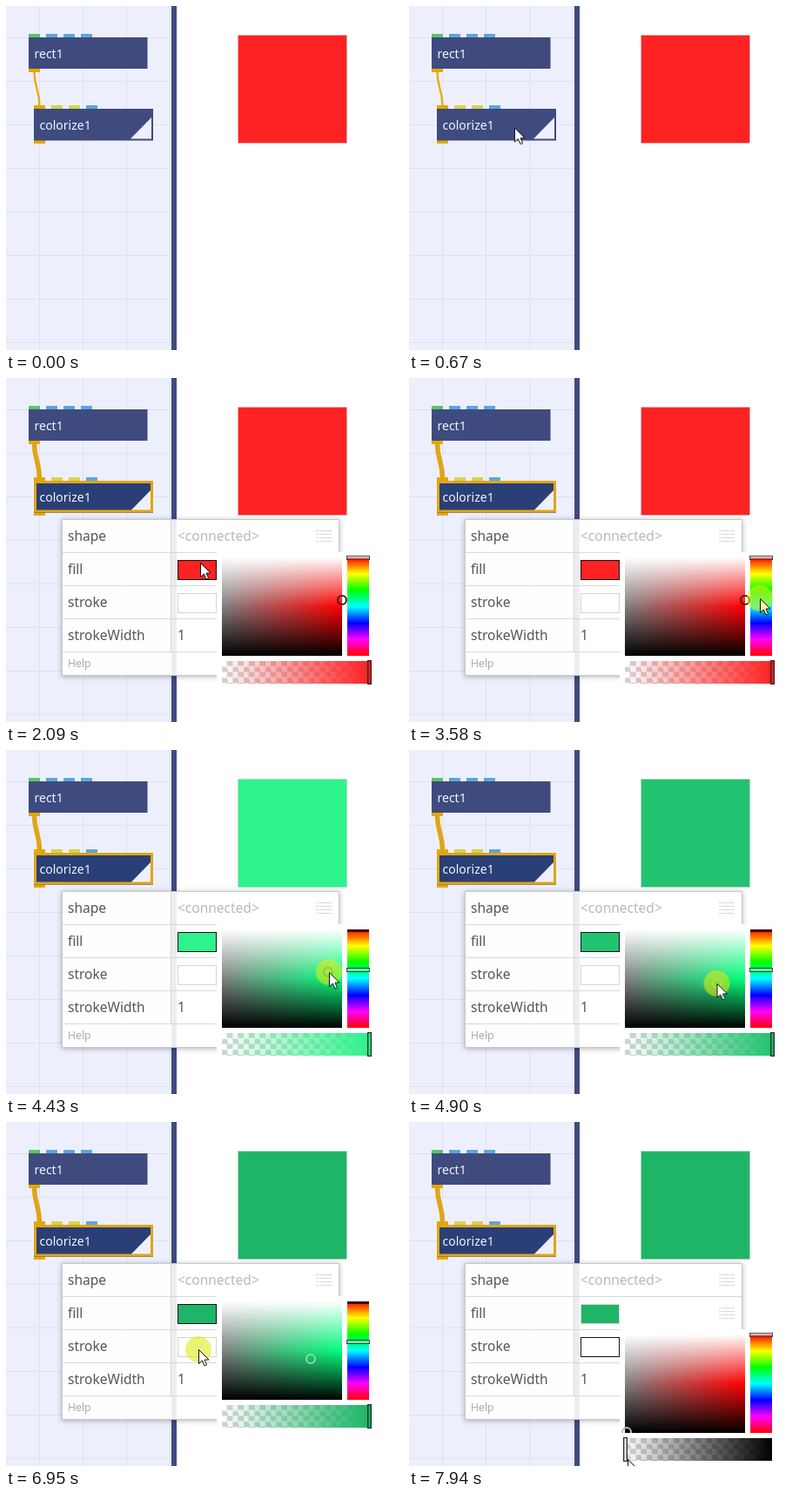
Recreate the animation shown at these times as an HTML page. Size 456 by 395 pixels, loop 8000 ms.

```html
<!DOCTYPE html>
<html lang="en">
<head>
<meta charset="utf-8">
<title>Colour picker</title>
<style>
html, body { margin: 0; width: 100%; height: 100%; overflow: hidden; background: #fff; }
body, text { font-family: "Noto Sans", "Open Sans", sans-serif; }
#stage { position: absolute; left: 0; top: 0; width: 456px; height: 395px; overflow: hidden; color: #f22; animation: tint 8s linear infinite; }
#stage div, #stage svg { position: absolute; box-sizing: border-box; }
#stage > svg { left: 0; top: 0; }
.label { font-size: 14px; font-weight: 500; fill: #f2f4fc; }

/* hard switches */
.on { animation: 8s step-end infinite; }
#hover { animation-name: hover; }
#picked { animation-name: picked; }
#panel { animation-name: panel; }
#first { animation-name: first; }
#second { animation-name: second; }

/* property panel */
#panel { left: 64px; top: 162px; width: 319px; height: 180px; border: 1px solid #c9c9c9; background: rgba(255,255,255,.9); box-shadow: 0 1px 6px rgba(0,0,0,.3); }
.row { left: 0; width: 317px; height: 38px; border-bottom: 1px solid #d8dad9; font-size: 15.5px; line-height: 37px; color: #555; white-space: nowrap; }
.row span, .foot span { position: absolute; left: 6px; }
.row .val { left: 132px; }
.split { left: 124px; top: 0; width: 1px; height: 152px; background: #d8dad9; }
.list { left: 291px; top: 12px; width: 18px; height: 13px; background: repeating-linear-gradient(#d9d9d9 0 1px, transparent 1px 4px); }
.list::after { content: ""; position: absolute; left: 3px; width: 1px; height: 13px; background: #fff; }
.swatch { left: 132px; top: 8px; width: 45px; height: 23px; border: 1px solid #d4d4d4; }
#fill { background: currentColor; animation-name: fillEdge; }
#stroke { background: #fff; animation-name: strokeEdge; }
.foot { left: 0; top: 152px; width: 317px; height: 26px; font-size: 12.2px; font-weight: 500; line-height: 25px; color: #aaacb2; }

/* colour picker */
.picker { left: 242px; width: 179px; height: 152px; background: #fff; }
.pane { left: 6px; top: 6px; width: 138px; height: 113px; background-color: red;
  background-image: linear-gradient(#fff, rgba(255,255,255,0) 50%, rgba(0,0,0,0) 50%, #000), linear-gradient(90deg, #808080, rgba(128,128,128,0)); }
.hue { left: 150px; top: 6px; width: 25px; height: 113px; background: linear-gradient(red, #ff0, lime, cyan, blue, #f0f, red); }
.alpha { left: 6px; top: 125px; width: 169px; height: 26px; background: linear-gradient(90deg, transparent, currentColor), repeating-conic-gradient(#d3d3d3 0 25%, #fff 0 50%) 0 0 / 12.5px 12.5px; }
.ring { width: 12px; height: 12px; margin: -6px; border: 2px solid #4c1822; border-radius: 50%; }
.bar { left: 149px; top: 4px; width: 27px; height: 5px; border: 1px solid rgba(40,30,30,.85); background: rgba(255,255,255,.35); }
.grip { left: 173px; top: 124px; width: 5px; height: 28px; border: 1px solid #2b2b2b; box-shadow: inset 0 0 0 1px rgba(0,0,0,.25); background: currentColor; }
#first { top: 200px; }
#first .pane { animation-name: pane; }
#first .ring { animation: ring 8s linear infinite; }
#first .bar { animation-name: bar; }
#mark { left: 150px; top: 6px; width: 25px; height: 3px; background: #3a0c0c; animation-name: mark; }
#second { top: 238px; color: #000; }
#second .ring { left: 8px; top: 118px; border-color: #b9b9b9; clip-path: inset(0 0 5px); }
#second .grip { left: 4px; background: #eee; }

/* pointer */
#pointer { left: 0; top: 0; width: 30px; height: 30px; overflow: visible; animation: move 8s linear infinite; }
#press { animation-name: press; }
#arrow { animation-name: arrow; }

@keyframes tint {
  0%, 45.5% { color: #f22; }
  45.6%, 53.6% { color: #22ff8e; }
  55.35% { color: #2ef28b; }
  63.1%, 100% { color: #1eb567; }
}
@keyframes hover { 0% { opacity: 0; } 9%, 100% { opacity: 1; } }
@keyframes picked { 0% { opacity: 0; } 12.2%, 100% { opacity: 1; } }
@keyframes panel { 0% { opacity: 0; } 13.2%, 100% { opacity: 1; } }
@keyframes first { 0% { opacity: 0; } 26.1% { opacity: 1; } 88.6%, 100% { opacity: 0; } }
@keyframes second { 0% { opacity: 0; } 88.6%, 100% { opacity: 1; } }
@keyframes fillEdge { 0% { border-color: #d4d4d4; } 26.1% { border-color: #111; } 88.6%, 100% { border-color: #d4d4d4; } }
@keyframes strokeEdge { 0% { border-color: #d4d4d4; } 88.6%, 100% { border-color: #111; } }
@keyframes pane { 0% { background-color: red; } 45.6%, 100% { background-color: #00ff7b; } }
@keyframes bar { 0% { top: 4px; } 45.6%, 100% { top: 50px; } }
@keyframes mark { 0% { opacity: 0; } 45.6%, 100% { opacity: 1; } }
@keyframes ring {
  0%, 45.5% { left: 143.5px; top: 55px; border-color: #4c1822; }
  45.6%, 53.6% { left: 143.5px; top: 55px; border-color: #2a7a4c; }
  55.35% { left: 128px; top: 55px; border-color: #4b9434; }
  63.1%, 100% { left: 107.5px; top: 72px; border-color: #8bd9ad; }
}
@keyframes press {
  0% { opacity: 0; } 12.2% { opacity: 1; } 13.2% { opacity: 0; }
  25.1% { opacity: 1; } 26.1% { opacity: 0; }
  43.6% { opacity: 1; } 45.6% { opacity: 0; }
  53.6% { opacity: 1; } 67.2% { opacity: 0; }
  86.85% { opacity: 1; } 88.6%, 100% { opacity: 0; }
}
@keyframes arrow { 0% { fill: #fff; } 43.6% { fill: #fbf6a0; } 45.6%, 100% { fill: #fff; } }
@keyframes move {
  0%, .85% { transform: translate(296px, 420px); }
  .88% { transform: translate(294px, 388px); animation-timing-function: cubic-bezier(.3,.2,.4,1); }
  10.25%, 17% { transform: translate(115px, 131px); animation-timing-function: ease-in-out; }
  25%, 32.9% { transform: translate(223px, 212px); animation-timing-function: ease-in-out; }
  38.5% { transform: translate(430px, 247px); animation-timing-function: ease-in-out; }
  42.75%, 47.6% { transform: translate(403px, 253px); }
  51.6%, 53.6% { transform: translate(384px, 253px); }
  55.35% { transform: translate(371px, 255px); }
  63.1%, 76% { transform: translate(348px, 272px); animation-timing-function: ease-in-out; }
  82.75%, 93.2% { transform: translate(221px, 261px); }
  95.3%, 98.8% { transform: translate(246px, 397px); }
  99.2%, 100% { transform: translate(251px, 387px); }
}
</style>
</head>
<body>
<div id="stage">
  <svg width="456" height="395">
    <defs>
      <pattern id="grid" x="38" y="36" width="50" height="50" patternUnits="userSpaceOnUse">
        <path d="M.5 0V50M0 .5H50" stroke="#dde1ee"/>
      </pattern>
    </defs>
    <path d="M0 0H190V395H0z" fill="#edf0fc"/>
    <path d="M0 0H190V395H0z" fill="url(#grid)"/>
    <path d="M190 0h6V395h-6z" fill="#3f4b7f"/>
    <rect x="266.5" y="33.5" width="125" height="124" fill="currentColor" stroke="#ccc" stroke-opacity=".5"/>

    <g fill="none" stroke-width="4" stroke-dasharray="13 7">
      <path d="M26 34h13" stroke="#5cc46a"/>
      <path d="M46 34h53M92 116h13" stroke="#5ea5dc"/>
      <path d="M52 116h33" stroke="#d6d24f"/>
      <path d="M26 74h13M32 116h13M32 156h13" stroke="#e3a805"/>
    </g>
    <path d="M32.5 75C32.5 95 38.5 95 38.5 115" fill="none" stroke="#e8ad0c" stroke-width="2.4"/>
    <path d="M26 36h136.500v36H26z" fill="#3f4b7f"/>
    <path d="M32 118h137v36.500H32z" fill="#3f4b7f"/>
    <path id="hover" class="on" d="M32 118h137v36.500H32z" fill="#293f75"/>
    <path d="M167 128v24.500h-24z" fill="#edf0fc"/>
    <g id="picked" class="on" fill="none" stroke="#e0a516">
      <path d="M32.500 75C32.500 95 38.500 95 38.500 115" stroke-width="5.500"/>
      <path d="M33.500 119.500h134v33.500h-134z" stroke-width="3"/>
    </g>
    <text class="label" x="32.500" y="60">rect1</text>
    <text class="label" x="38.500" y="142">colorize1</text>
  </svg>

  <div id="panel" class="on">
    <div class="row" style="top:0"><span>shape</span><span class="val" style="color:#b9b9b9">&lt;connected&gt;</span><div class="list"></div></div>
    <div class="row" style="top:38px"><span>fill</span><div class="list"></div></div>
    <div class="row" style="top:76px"><span>stroke</span><div id="stroke" class="swatch on"></div><div class="list"></div></div>
    <div class="row" style="top:114px"><span>strokeWidth</span><span class="val">1</span><div class="list"></div></div>
    <div style="left:0;top:38px"><div id="fill" class="swatch on"></div></div>
    <div class="split"></div>
    <div class="foot"><span>Help</span><span style="left:auto;right:6px">View Source</span></div>
  </div>

  <div id="first" class="picker on">
    <div class="pane on"></div><div class="hue"></div><div id="mark" class="on"></div><div class="alpha"></div>
    <div class="ring"></div><div class="bar on"></div><div class="grip"></div>
  </div>
  <div id="second" class="picker on">
    <div class="pane"></div><div class="hue"></div><div class="alpha"></div>
    <div class="ring"></div><div class="bar"></div><div class="grip"></div>
  </div>

  <svg id="pointer">
    <circle id="press" class="on" r="15" fill="#dcea14" fill-opacity=".58"/>
    <path id="arrow" class="on" d="M.5 .5V16.500L4.300 13 7 19 9.600 17.800 7 12H12z" fill="#fff" stroke="#111"/>
  </svg>
</div>
</body>
</html>
```
